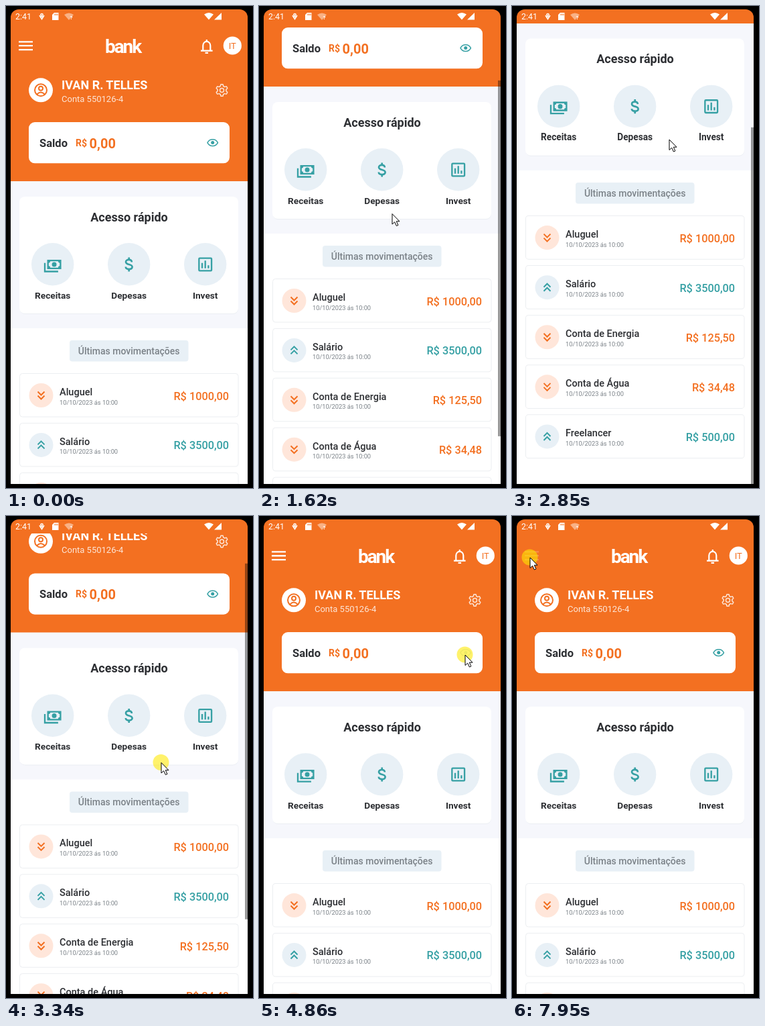
Animation of 369x718 px, one loop 8000 ms. Source, as an HTML page:

```html
<!DOCTYPE html>
<html lang="pt-BR">
<head>
<meta charset="utf-8">
<title>Banco</title>
<style>
  html, body { margin: 0; width: 100%; height: 100%; overflow: hidden; background: #000; }
  svg { display: block; width: 369px; height: 718px; font-family: Roboto, sans-serif; }
  .line { fill: none; stroke: currentColor; stroke-width: 2; }
  .thin { stroke-width: 1.5; }
</style>
</head>
<body>
<svg id="stage" viewBox="0 0 369 718"></svg>
<script>
const ORANGE = '#f37021', TEAL = '#36a0a4', PALE = '#e8f0f6', DARK = '#2d2f33', GRAY = '#7b8288';
const LOOP = 8000, TOP = 5, BOTTOM = 712, STATUS = 26;

const text = (x, y, size, weight, fill, str, extra = '') =>
  `<text x="${x}" y="${y}" font-size="${size}" font-weight="${weight}" fill="${fill}" ${extra}>${str}</text>`;
const mid = 'text-anchor="middle"';
const box = (x, y, w, h, r, fill, extra = '') =>
  `<rect x="${x}" y="${y}" width="${w}" height="${h}" rx="${r}" fill="${fill}" ${extra}/>`;
const disc = (x, y, r, fill) => `<circle cx="${x}" cy="${y}" r="${r}" fill="${fill}"/>`;
// Line icon drawn around 0, 0
const icon = (x, y, color, body, scale = 1) =>
  `<g class="line" color="${color}" transform="translate(${x} ${y}) scale(${scale})">${body}</g>`;

const MENU = '<path d="M-9 -5H9M-9 0H9M-9 5H9"/>';
const BELL = '<path d="M-5 6V-1A5 5.5 0 0 1 5 -1V6M-8 6H8M0 -9V-6M-2 9H2"/>';
const USER = '<circle r="9"/><circle cy="-2.5" r="3"/><path d="M-6 6.5Q0 0 6 6.5"/>';
const CASH = '<path fill="currentColor" stroke="none" fill-rule="evenodd" d="M-7 -6H11V6H-7ZM2 -3a3 3 0 0 1 0 6 3 3 0 0 1 0 -6M-3 -4a2 2 0 0 1 -2 2v4a2 2 0 0 1 2 2H7a2 2 0 0 1 2 -2v-4a2 2 0 0 1 -2 -2Z"/><path d="M-10 -2V9H7"/>';
const DOLLAR = '<path stroke-width="2.3" d="M3.6 -3C3.4 -7 -4 -7 -4 -3.2C-4 1 4.2 -1 4.2 3.2C4.2 7 -4 7 -4.2 3M0 -9V-6M0 6V9"/>';
const CHART = '<rect x="-8" y="-8" width="16" height="16" rx="1"/><path d="M-4 -2V5M0 -5V5M4 1V5"/>';
const EYE = '<path class="thin" d="M-7.7 0C-4.5 -6.5 4.5 -6.5 7.7 0C4.5 6.5 -4.5 6.5 -7.7 0Z"/><circle r="2.5" fill="currentColor" stroke="none"/><path id="slash" class="thin" d="M-6 -6L6 6"/>';

// Six-toothed gear: the radius follows a clipped cosine
function gear() {
  let d = '';
  for (let deg = 0; deg < 360; deg += 5) {
    const wave = Math.max(-1, Math.min(1, 2.5 * Math.cos(deg * Math.PI / 30)));
    const r = 7.6 + 1.2 * wave, a = (deg - 90) * Math.PI / 180;
    d += `${d ? 'L' : 'M'}${r * Math.cos(a)} ${r * Math.sin(a)}`;
  }
  return `<path class="thin" stroke-linejoin="round" d="${d}Z"/><circle class="thin" r="3"/>`;
}

const status = box(0, TOP, 369, STATUS - TOP, 0, ORANGE) +
  text(14, 20.3, 12.4, 400, '#fff', '2:41') +
  icon(53.5, 15, '#fff', '<path class="thin" d="M-3.5 -1L0 4.5L3.5 -1M-2 1H2"/><circle class="thin" cy="-2" r="1.6"/>') +
  '<path fill="#fff" d="M72 10h6.5v11h-9.5v-8z"/><path stroke="#f37021" d="M73 11.5v2.5M75 11.5v2.5M77 11.5v2.5"/>' +
  '<path fill="#fff" opacity=".45" d="M87 13Q94 8 101 13L94 21Z"/>' +
  text(95.5, 20, 8, 700, '#fff', '?') +
  '<path fill="#fff" d="M296 12.5Q303 7.5 310 12.5L303 20.5ZM322 10v10.5h-11z"/>';

const header = box(0, -60, 369, 321, 0, ORANGE) +
  `<g id="menu">${icon(29.5, 59.2, '#fff', MENU, 1.17)}</g>` +
  text(148, 70, 28, 700, '#fff', 'bank', 'letter-spacing="-2.1"') +
  icon(299.8, 60, '#fff', BELL, 1.1) +
  disc(338.3, 59, 13.6, '#fff') + text(338.3, 63.6, 13, 400, ORANGE, 'IT', mid) +
  disc(52, 125.3, 18, '#fff') + icon(52, 125.3, ORANGE, USER) +
  text(83, 124, 18, 700, '#fff', 'IVAN R. TELLES') +
  text(83, 142.5, 13, 400, '#fff', 'Conta 550126-4', 'opacity=".82"') +
  icon(322.5, 125.5, '#fde5d6', gear()) +
  box(34, 173, 300, 61.3, 9, '#fff') +
  text(50, 210, 16.5, 700, DARK, 'Saldo') +
  `<g id="balance">${text(104, 209, 14, 700, ORANGE, 'R$')}${text(124.6, 211.7, 20, 700, ORANGE, '0,00')}</g>` +
  `<g id="mask">${box(102.5, 189.5, 168.5, 28, 4, PALE)}</g>` +
  `<g id="eye">${icon(308.7, 203.6, TEAL, EYE)}</g>`;

const shortcut = ([label, art], i) => {
  const x = 69.7 + i * 114;
  return disc(x, 384.8, 31.7, PALE) + icon(x, 385, TEAL, art, 1.17) +
    text(x, 435.5, 13.7, 700, DARK, label, mid);
};

const quick = box(0, 250, 369, 230, 0, '#f6f7fc') +
  box(20.5, 285, 326.5, 174, 8, '#ebeef3') + box(20, 284, 327, 174, 8, '#fff') +
  text(184, 321, 18, 700, DARK, 'Acesso rápido', mid) +
  [['Receitas', CASH], ['Depesas', DOLLAR], ['Invest', CHART]].map(shortcut).join('');

const moves = [
  ['Aluguel', '1000,00', false],
  ['Salário', '3500,00', true],
  ['Conta de Energia', '125,50', false],
  ['Conta de Água', '34,48', false],
  ['Freelancer', '500,00', true]
];
const row = ([name, value, income], i) => {
  const y = 547.5 + i * 73.9, color = income ? TEAL : ORANGE;
  return box(20.5, y, 326.5, 64.5, 4, '#fff', 'stroke="#eceef1"') +
    disc(52.5, y + 32.5, 18, income ? PALE : '#ffe6da') +
    icon(52.5, y + 32.5, color, `<path transform="scale(1 ${income ? -1 : 1})" d="M-5 -5.5L0 -.5L5 -5.5M-5 .5L0 5.5L5 .5"/>`) +
    text(80, y + 32.5, 14.5, 500, DARK, name) +
    text(80, y + 46, 9.3, 400, GRAY, '10/10/2023 ás 10:00') +
    text(333, y + 39, 16.3, 500, color, 'R$ ' + value, 'text-anchor="end"');
};

// Sections overlap from the bottom up, so no seam shows between them
const list = box(0, 250, 369, 800, 0, '#fff') +
  box(95, 498, 177.5, 31.5, 4, PALE) +
  text(183.7, 519, 14, 500, GRAY, 'Últimas movimentações', mid) +
  moves.map(row).join('');

document.getElementById('stage').innerHTML = `
  <clipPath id="phone"><rect x="7" y="${TOP}" width="354" height="740" rx="12"/></clipPath>
  <clipPath id="view"><rect y="${STATUS}" width="369" height="${BOTTOM - STATUS}"/></clipPath>
  <g clip-path="url(#phone)">
    <g clip-path="url(#view)">
      <g id="page">${list}${quick}${header}</g>
      <rect id="bar" x="357" width="4" fill-opacity=".4"/>
      <g id="pointer">
        <circle id="glow" cx="-.5" cy="-.5" r="12" fill="#ffe900" fill-opacity=".58"/>
        <path d="M0 0V15.5L3.7 12.2L6.4 18L8.9 16.9L6.3 11.2H11Z" fill="#fff" stroke="#000"/>
      </g>
    </g>
    ${status}
  </g>`;

const parts = Object.fromEntries(
  ['page', 'bar', 'pointer', 'glow', 'menu', 'balance', 'mask', 'eye', 'slash']
    .map(id => [id, document.getElementById(id)]));
const set = (id, name, value) => parts[id].setAttribute(name, value);
const show = (id, on) => set(id, 'visibility', on ? 'visible' : 'hidden');
const clamp = (v, lo, hi) => Math.min(hi, Math.max(lo, v));
const mix = (a, b, k) => a + (b - a) * k;

const MAX_SCROLL = 234, SLOP = 22, ENTER = 580, BAR_END = 4300;
const EYE_AT = [308, 207], MENU_AT = [27, 62];

// A drag moves from one point to another, may hold there, then lets go
const drags = [
  { at: 1000, ms: 620, hold: 0, from: [196, 472], to: [199, 309] },
  { at: 1900, ms: 540, hold: 0, from: [196, 472], to: [210, 199] },
  { at: 2950, ms: 694, hold: 256, from: [241, 199], to: [225, 498] }
];
const eyeTaps = [{ at: 4850, up: 5000 }, { at: 6150, up: 6350 }];
const menuTap = { at: 7880, up: LOOP };
const presses = [...drags.map(d => ({ at: d.at, up: d.at + d.ms + d.hold })), ...eyeTaps, menuTap];

const stops = [
  [ENTER, [225, 700]],
  ...drags.flatMap(d => [[d.at, d.from], [d.at + d.ms, d.to]]),
  [4200, [225, 498]], [4720, EYE_AT], [6380, EYE_AT],
  [6620, [238, 217]], [7120, [39, 96]], [7620, MENU_AT], [LOOP, MENU_AT]
];

function pointerAt(t) {
  const i = Math.max(1, stops.findIndex(s => s[0] > t));
  const [[t0, a], [t1, b]] = [stops[i - 1], stops[i]];
  const k = clamp((t - t0) / (t1 - t0), 0, 1);
  return [mix(a[0], b[0], k), mix(a[1], b[1], k)];
}

// Drags add up to the scroll; what goes past an end stretches the page and springs back
function scrollAt(t) {
  let scroll = 0, stretch = 0, pivot = TOP;
  for (const d of drags) {
    if (t < d.at) break;
    const dy = (d.from[1] - d.to[1]) * clamp((t - d.at) / d.ms, 0, 1);
    const free = scroll + Math.sign(dy) * Math.max(0, Math.abs(dy) - SLOP);
    scroll = clamp(free, 0, MAX_SCROLL);
    const released = Math.max(0, t - d.at - d.ms - d.hold);
    stretch = .02 * (1 - Math.exp(-Math.abs(free - scroll) / 36)) * Math.exp(-released / 196);
    pivot = free > scroll ? BOTTOM : TOP;
  }
  return { scroll, stretch, pivot };
}

// Pressed buttons fade at once and recover after release
const tapOpacity = (tap, t) =>
  t < tap.at ? 1 : mix(.2, 1, clamp((t - tap.up) / 250, 0, 1));

function draw(t) {
  const { scroll, stretch, pivot } = scrollAt(t);
  set('page', 'transform',
    `translate(0 ${pivot}) scale(1 ${1 + stretch}) translate(0 ${-pivot - scroll})`);

  set('bar', 'y', TOP + scroll * .751);
  set('bar', 'height', 530 * (1 + stretch));
  set('bar', 'opacity', t < drags[0].at + 80 ? 0 : 1 - clamp((t - BAR_END) / 250, 0, 1));

  set('pointer', 'transform', `translate(${pointerAt(t)})`);
  show('pointer', t >= ENTER);
  set('glow', 'opacity', presses.some(p => t >= p.at && t < p.up) ? 1 : 0);

  const masked = t >= eyeTaps[0].up && t < eyeTaps[1].up;
  show('balance', !masked);
  show('mask', masked);
  show('slash', masked);
  set('eye', 'opacity', Math.min(...eyeTaps.map(tap => tapOpacity(tap, t))));
  set('menu', 'opacity', tapOpacity(menuTap, t));
}

const start = performance.now();
function tick() {
  draw((performance.now() - start) % LOOP);
  requestAnimationFrame(tick);
}
tick();
</script>
</body>
</html>
```
